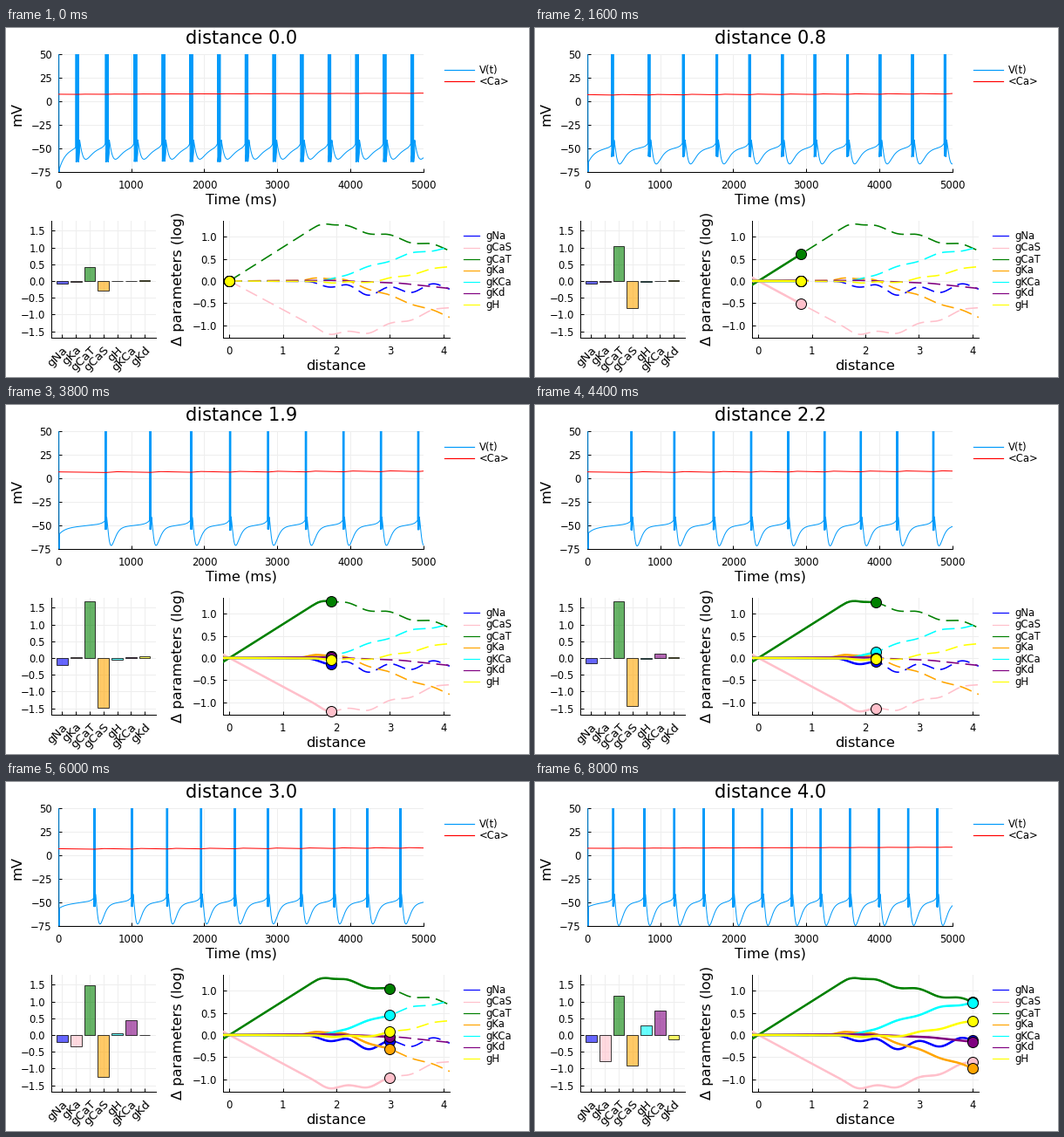
A matplotlib script for the animation above (8200 ms loop, 600 by 400 pixels).

```python
import numpy as np
import matplotlib.pyplot as plt
from matplotlib.animation import FuncAnimation

W, H = 600, 400
FRAMES, STEP_MS = 41, 200
PX = 0.72  # points per pixel at 100 dpi
TICK, GUIDE, TITLE = 11.6 * PX, 16.2 * PX, 20.9 * PX
BLUE = "#009afa"
PEAK, END = 1.9, 4.0  # slowest firing, last distance
SPIKES = 3
T = np.arange(0, 5001.0)

plt.rcParams["font.family"] = "DejaVu Sans"

# name: colour, turning points of the trend, wiggle size
PATHS = {
    "gNa": ("blue", [(0, 0), (1.45, -.01), (2.6, -.25), (4.2, -.11)], .08),
    "gCaS": ("pink", [(0, 0), (1.85, -1.2), (2.6, -1.15), (4.2, -.54)], .04),
    "gCaT": ("green", [(0, 0), (1.75, 1.33), (4.2, .69)], .04),
    "gKa": ("orange", [(0, 0), (1.4, .01), (1.6, .08), (2.1, .04),
                       (4.2, -.84)], .02),
    "gKCa": ("cyan", [(0, 0), (1.8, 0), (3.4, .62), (4.2, .77)], -.02),
    "gKd": ("purple", [(0, 0), (1.9, .015), (3.2, -.05), (4.2, -.18)], 0),
    "gH": ("yellow", [(0, 0), (1.7, -.01), (2, -.05), (2.8, 0),
                      (4.2, .36)], .02),
}
BARS = ["gNa", "gKa", "gCaT", "gCaS", "gH", "gKCa", "gKd"]
BAR_COLORS = ["blue", "pink", "green", "orange", "cyan", "purple", "yellow"]
BAR_BASE = {"gNa": -.07, "gKa": -.03, "gCaT": .43, "gCaS": -.29, "gKd": .03}


def path(name, x):
    """Trend with rounded corners plus a wiggle that fades in."""
    _, points, amp = PATHS[name]
    px, py = np.transpose(points)
    x = np.asarray(x, float)
    slope = py[1] / px[1]
    trend = np.mean([np.where(x + h < 0, slope * (x + h),
                              np.interp(x + h, px, py))
                     for h in (-.1, -.05, 0, .05, .1)], axis=0)
    fade = np.clip((x - 1.4) / 0.8, 0, 1)
    return trend + amp * fade * np.sin(2 * np.pi * (x - 2) / 0.8)


def swing(d, start, peak, end, power):
    """Rise to the peak as a power law, then fall in a straight line."""
    if d < PEAK:
        return start + (peak - start) * (d / PEAK) ** power
    return peak + (end - peak) * (d - PEAK) / (END - PEAK)


def plateau(u):
    return -53 + 4.5 * u + 4 * np.exp(14 * (np.minimum(u, 1) - 1))


def traces(d):
    """Membrane voltage and mean calcium at distance d."""
    first = swing(d, 262, 650, 358, 1.75)
    gap1 = swing(d, 406, 614, 425, 0.9)
    gap_end = swing(d, 378, 512, 399, 0.8)
    dip = np.interp(d, [0, 1.5, END], [10, 19, 23])
    dip_at = np.interp(d, [0, PEAK], [85, 60])
    isi = np.interp(d, [0, 1.4], [18, 8])
    low = np.interp(d, [0, 1.4], [-68, -59])
    width = SPIKES * isi

    v = plateau(T / first) - 24 * np.exp(-d / 1.7 - T / 80)
    v[T < 18] = -75
    v[T < 12] = 60
    wave = -np.minimum(T / first, 1)

    centre, n = first, 0
    while centre < T[-1] + width:
        gap = gap_end + (gap1 - gap_end) * 0.45**n
        begin = centre - 0.4 * width
        on = T >= begin
        t = T[on] - begin
        s = np.maximum(t - width, 0)
        x = s / dip_at
        rest = plateau(s / (gap - width)) + 12 * np.exp(-s / 22)
        rest -= dip * (x * np.exp(1 - x)) ** 2
        k, phase = np.divmod(t / isi, 1)
        burst = np.where(phase < 0.25, 62 - 6 * k, low + 14 * phase)
        v[on] = np.where(t < width, burst, rest)
        q = t / gap
        wave[on] = -1 + np.minimum(q / 0.25, 1) - np.maximum(q - 0.25, 0) / 0.75
        centre += gap
        n += 1

    sag = np.sin(np.pi * d / END)
    ca = 7.4 - 0.7 * sag + 1.2 * T / T[-1] + (0.3 + 0.6 * sag) * wave
    return v, ca


fig = plt.figure(figsize=(W / 100, H / 100), dpi=100, facecolor="white")


def label(x, y, text, size, **kw):
    return fig.text(x / W, 1 - y / H, text, fontsize=size,
                    rotation_mode="anchor", **kw)


def panel(x0, y0, x1, y1, xlim, ylim):
    ax = fig.add_axes([x0 / W, 1 - y1 / H, (x1 - x0) / W, (y1 - y0) / H])
    ax.set(xlim=xlim, ylim=ylim)
    ax.spines[["top", "right"]].set_visible(False)
    ax.spines[["left", "bottom"]].set_linewidth(PX)
    ax.tick_params(direction="in", length=4 * PX, width=PX, labelsize=TICK)
    ax.tick_params(axis="x", pad=9 * PX)
    ax.tick_params(axis="y", pad=7 * PX)
    ax.grid(color="#eeeeee", linewidth=PX)
    ax.set_axisbelow(True)
    return ax


def key(x0, x1, tx, y, color, text):
    fig.add_artist(plt.Line2D([x0 / W, x1 / W], [1 - y / H] * 2, color=color,
                              linewidth=1.2 * PX))
    label(tx, y + 4, text, TICK)


# Voltage panel
top = panel(59.8, 29.9, 478.8, 164.9, (0, 5000), (-75, 50))
top.set_xticks(range(0, 5001, 1000))
top.set_yticks(range(-75, 51, 25))
volt, = top.plot([], [], color=BLUE, linewidth=PX, zorder=3)
calc, = top.plot([], [], color="red", linewidth=PX, zorder=3)
title = label(270, 18.5, "", TITLE, ha="center")
label(270, 201.5, "Time (ms)", GUIDE, ha="center")
label(17.5, 98, "mV", GUIDE, ha="center", rotation=90)
key(502.5, 537, 543, 48, BLUE, "V(t)")
key(502.5, 537, 543, 61, "red", "<Ca>")

# Bar panel
left = panel(51.8, 220.9, 171.8, 354.9, (0.2, 7.8), (-1.69, 1.8))
left.set_xticks(range(1, 8), [""] * 7)
left.set_yticks(np.arange(-1.5, 1.6, 0.5))
left.yaxis.set_major_formatter("{x:.1f}")
bars = left.bar(range(1, 8), [0] * 7, width=0.8, linewidth=PX,
                color=[(c, 0.6) for c in BAR_COLORS],
                edgecolor=(0, 0, 0, 0.75), zorder=3)
for i, name in enumerate(BARS):
    label(69 + 15.8 * i, 367, name, 13.4 * PX, ha="right", va="center",
          rotation=45)

# Path panel
right = panel(248.8, 220.9, 509.3, 354.9, (-0.122, 4.125), (-1.28, 1.36))
right.set_xticks(range(5))
right.set_yticks(np.arange(-1, 1.1, 0.5))
right.yaxis.set_major_formatter("{x:.1f}")
label(379, 392.5, "distance", GUIDE, ha="center")
label(202, 287.5, "Δ parameters (log)", GUIDE, ha="center", rotation=90)

full = np.linspace(0, 4.12, 300)
solid, dots = {}, {}
for i, (name, (color, _, _)) in enumerate(PATHS.items()):
    right.plot(full, path(name, full), color=color, linewidth=1.6 * PX,
               dashes=(9, 4.5), dash_capstyle="butt", zorder=3)
    solid[name], = right.plot([], [], color=color, linewidth=2.5 * PX,
                              zorder=4 + 0.1 * i)
    dots[name], = right.plot([], [], "o", color=color, markersize=12 * PX,
                             markeredgecolor="black", markeredgewidth=PX,
                             clip_on=False, zorder=5 + 0.1 * i)
    key(525, 543, 550, 238.5 + 13 * i, color, name)


def update(i):
    d = i / 10
    title.set_text(f"distance {d:.1f}")
    v, ca = traces(d)
    volt.set_data(T, v)
    calc.set_data(T, ca)
    for bar, name in zip(bars, BARS):
        bar.set_height(BAR_BASE.get(name, -.01) + float(path(name, d)))
    x = np.linspace(-0.122, d, 200) if i else np.array([])
    for name in PATHS:
        solid[name].set_data(x, path(name, x))
        dots[name].set_data([d], [float(path(name, d))])
    return []


anim = FuncAnimation(fig, update, frames=FRAMES, interval=STEP_MS,
                     repeat=True, repeat_delay=0, blit=False)
plt.show()
```
